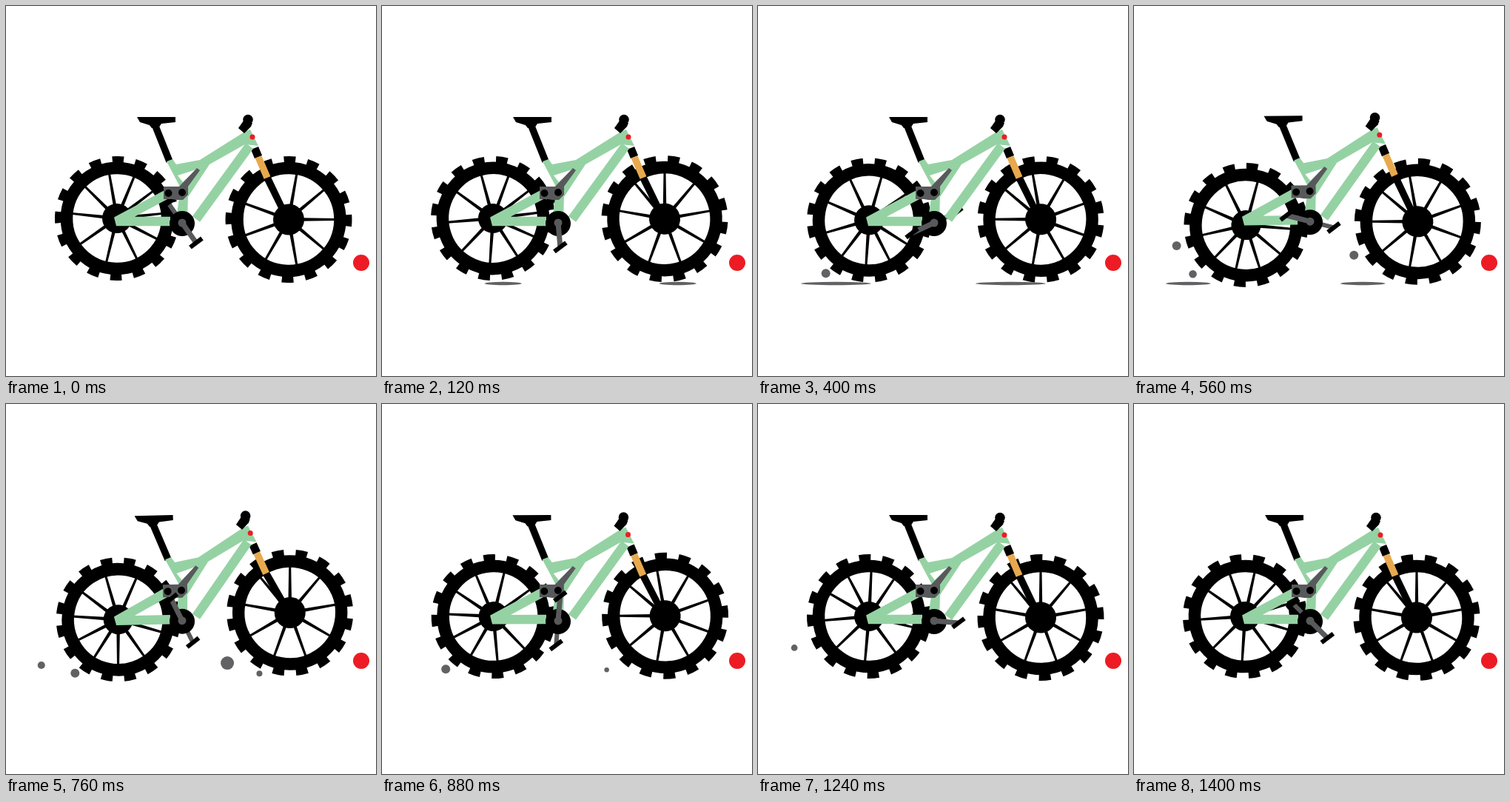
These frames come from a looping animation (500 px wide and 500 px high, 1440 ms). An HTML page:

```html
<!DOCTYPE html>
<html lang="en">
<head>
<meta charset="utf-8">
<title>Bike ride</title>
<style>
  html, body { margin: 0; height: 100%; overflow: hidden; background: #fff; }
  svg { display: block; width: 100vw; height: 100vh; }
  .green { fill: #95d2a3; }
  .tube { fill: none; stroke: #95d2a3; stroke-width: 12.5; }
  .grey { fill: #58595b; }
  .dust { fill: #626264; }
  .red { fill: #ed1c24; }
</style>
</head>
<body>
<svg viewBox="0 0 500 500">
  <g id="dust" class="dust"></g>
  <g id="rear"></g>
  <g id="front"></g>
  <path id="fork"/>
  <g id="bike">
    <g id="farCrank"></g>
    <path d="M201 160L221 210" stroke="#000" stroke-width="9.5"/>
    <path d="M177 150H229V157L210 159 206 165H197L194 161 181 157Z"/>
    <path d="M336 192L341 204" stroke="#000" stroke-width="11"/>
    <path d="M341 204L353 232" stroke="#e8a94e" stroke-width="9.5"/>
    <path class="tube" d="M222 291H149L218 254M329 189L257 288"/>
    <path class="green" d="M217 210L225 207 230 214 262 208 324 169 330 167 341 189 323 187 275 214 246 258 245 290 231 280 236 246Z"/>
    <path fill="#fff" d="M232 229L257 221 239 238Z"/>
    <path class="grey" d="M258 219L262 222 243 248 232 246Z"/>
    <path class="grey" d="M213 244H246V255L239 262H230L224 261H213Z"/>
    <circle cx="219.5" cy="253" r="5"/>
    <circle cx="238" cy="252" r="5"/>
    <circle cx="327" cy="153.5" r="6.8"/>
    <path d="M321 155L333 158 331 163 322 172 314 165Z"/>
    <circle class="red" cx="333" cy="177" r="3.5"/>
    <circle cx="238" cy="294" r="17"/>
    <g id="nearCrank"></g>
  </g>
  <circle class="red" cx="480" cy="347" r="11"/>
</svg>
<script>
const LOOP = 1440, STEP = 40, WHEELBASE = 236;
const $ = id => document.getElementById(id);

// Dust thrown back from a tyre: born, life, start x, rise, radius
const PUFFS = [
  [360, 280, 95, 68, 6],
  [440, 420, 89, 18, 5.3],
  [700, 660, 95, 48, 6],
  [400, 240, 331, 52, 6],
  [600, 260, 329, 31, 9],
  [720, 200, 348, 8, 4]
];

// Smooth hump: 1 at the centre, 0 beyond the half width
const hump = (t, centre, half) =>
  Math.abs(t - centre) < half ? Math.cos(Math.PI / 2 * (t - centre) / half) ** 2 : 0;

function buildWheel(id, r, hub, spokes, wobble) {
  let html = `<circle r="${hub}"/>`;
  for (let i = 0; i < spokes; i++) {
    const a = i * 360 / spokes;
    const uneven = -wobble * Math.cos((a - 47) * Math.PI / 180);
    html += `<path d="M0 -2.5L${r - 14} -1.5V1.5L0 2.5Z" transform="rotate(${a + uneven})"/>`;
  }
  $(id).innerHTML = html + `<g fill="none" stroke="#000" transform="rotate(1)">
    <circle r="${r - 8}" stroke-width="16.5"/>
    <circle r="${r + 3}" stroke-width="10" pathLength="16" stroke-dasharray=".5" stroke-dashoffset=".25"/>
  </g>`;
}

function crank(angle, width) {
  const x = 238 + 33 * Math.cos(angle), y = 293 + 33 * Math.sin(angle);
  return `<path d="M238 293L${x} ${y}" stroke="#58595b" stroke-width="${width}"/>
    <circle class="grey" cx="238" cy="293" r="5.5"/>
    <path d="M-10 -3H10V3H-10Z" transform="translate(${x} ${y}) rotate(-37)"/>`;
}

// Ground streak: its tail shoots back first, then its head catches up
function streak(t, dx) {
  const p = (t - 40) / 680;
  if (p <= 0 || p >= 1) return '';
  const tail = 30 + 160 * Math.exp(-3.3 * p), head = 190 - 160 * p ** 2.3;
  const half = (head - tail) / 2;
  return half > 0 ? `<ellipse cx="${tail + half + dx}" cy="375" rx="${half}" ry="2.2"/>` : '';
}

function puff([born, life, x, rise, r], t) {
  const p = (t - born) / life;
  if (p <= 0 || p >= 1) return '';
  const e = p ** 1.5, size = r * Math.min(1, p * 12, (1 - p) * 4);
  return `<circle cx="${x - 62 * e}" cy="${365 - rise * e}" r="${size}"/>`;
}

function draw(t) {
  const turn = t / LOOP * 360, angle = (55 + turn) * Math.PI / 180;
  const lift = -3 * hump(t, 630, 160), tilt = -1.6 * hump(t, 700, 240);
  const shift = 2 * hump(t, 680, 320);
  const rearY = 287 + 9.5 * hump(t, 600, 300);
  const frontX = 382 + shift;
  const frontY = 288.5 - 2.5 * hump(t, 240, 200) + 3 * hump(t, 540, 150) - 6.5 * hump(t, 760, 200);

  const place = (id, x, y) => $(id).setAttribute('transform', `translate(${x} ${y}) rotate(${turn})`);
  place('rear', 150 + shift, rearY);
  place('front', frontX, frontY);
  $('bike').setAttribute('transform', `translate(0 ${lift}) rotate(${tilt} 238 293)`);

  // The fork joins the tilting frame to the front hub
  const a = tilt * Math.PI / 180;
  const onFrame = (x, y) => `${x - a * (y - 293)} ${y + a * (x - 238) + lift}`;
  $('fork').setAttribute('d', `M${onFrame(348, 233)}L${onFrame(357, 229)} ${frontX + 2} ${frontY - 3} ${frontX - 5} ${frontY + 3}Z`);

  $('farCrank').innerHTML = crank(angle + Math.PI, 6);
  $('nearCrank').innerHTML = crank(angle, 7);
  $('dust').innerHTML = streak(t, 0) + streak(t, WHEELBASE) + PUFFS.map(p => puff(p, t)).join('');
}

buildWheel('rear', 76, 20, 10, 9);
buildWheel('front', 77.5, 21, 9, 0);

function tick() {
  draw(Math.floor(performance.now() % LOOP / STEP) * STEP);
  requestAnimationFrame(tick);
}
tick();
</script>
</body>
</html>
```
